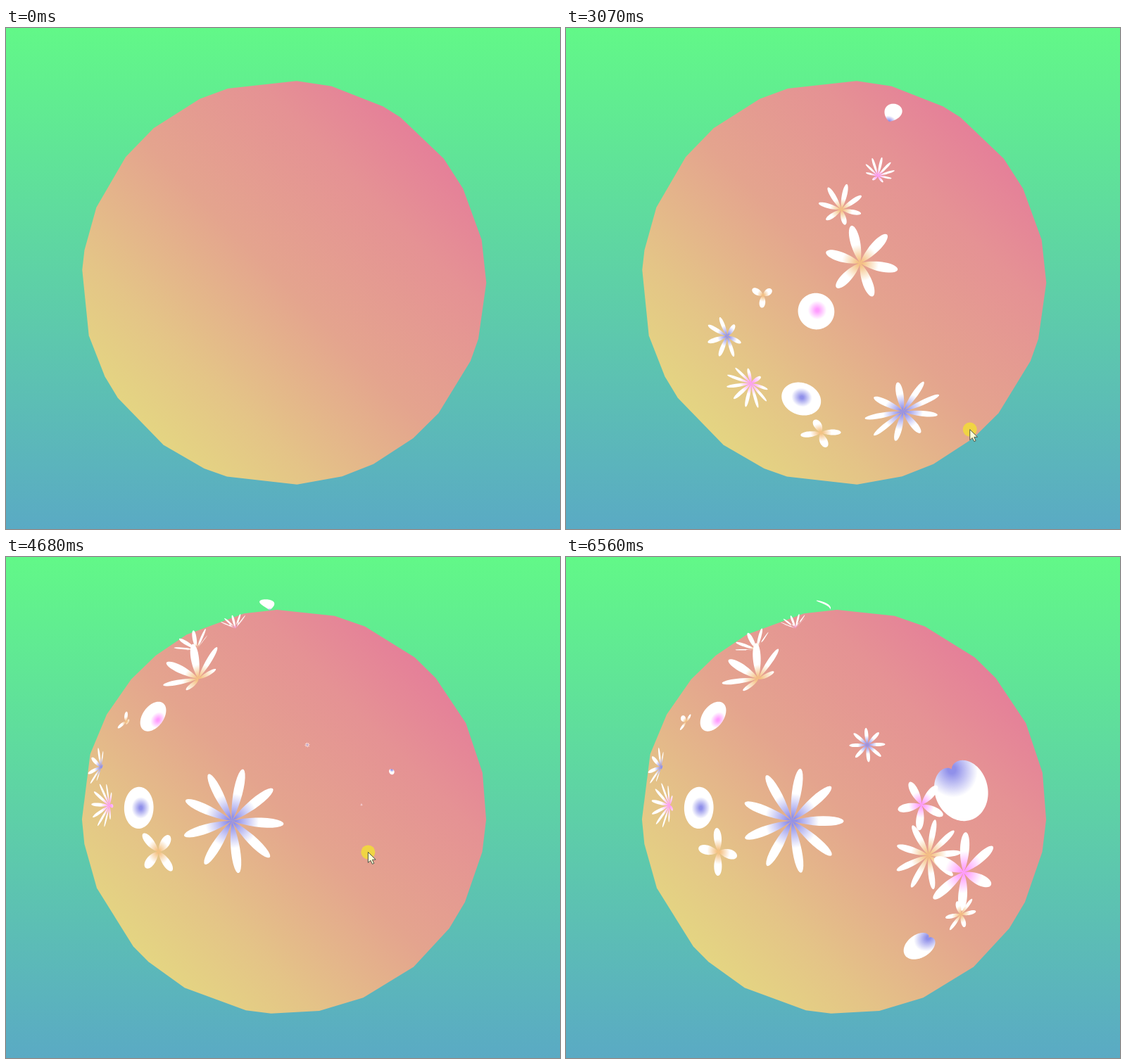
An HTML page with a canvas for the animation above (6640 ms loop, 787 by 712 pixels).

```html
<!DOCTYPE html>
<html>
<head>
<meta charset="utf-8">
<style>
  html, body { margin: 0; width: 100%; height: 100%; overflow: hidden; }
  canvas { display: block; }
</style>
</head>
<body>
<canvas id="stage" width="787" height="712"></canvas>
<script>
const ctx = document.getElementById('stage').getContext('2d');
const LOOP = 6640, FIRST = 110, STEP = 78.3;
const CX = 395, CY = 362, RADIUS = 287.3, CORNERS = 28;
const FOCAL = 763, DIST = 2.84;            // perspective camera, unit sphere
const RAD = Math.PI / 180, TURN = 36 * RAD;
const AXIS = [0.748, -0.663, 0.026];       // the drag turns the ball about this
const BLUE = '#9090ea', PINK = '#ff9cff', ORANGE = '#f5c284';

// x, y, petals (0 is a disc), petal length, heart colour
const firstRow = [
  [459, 133, 1, 30, BLUE], [443, 210, 9, 27, PINK], [391, 258, 7, 37, ORANGE], [418, 334, 6, 57, ORANGE],
  [357, 401, 0, 28, PINK], [263, 505, 10, 38, PINK], [229, 438, 7, 33, BLUE], [280, 380, 3, 18, ORANGE],
  [335, 525, 0, 32, BLUE], [362, 575, 4, 37, ORANGE], [479, 545, 9, 75, BLUE]
];
const secondRow = [
  [428, 267, 8, 26, BLUE], [548, 302, 1, 80, BLUE], [505, 352, 5, 37, PINK], [515, 424, 9, 53, ORANGE],
  [565, 448, 6, 63, PINK], [515, 541, 1, 46, BLUE], [561, 508, 6, 30, ORANGE]
];

const plant = (row, born, gap, turns, offset) => row.map(([x, y, petals, size, color], k) => {
  const i = k + offset;
  return {
    x, y, petals, color, turns, born: born + gap * k, pos: unproject(x, y), size: size / 411,
    cup: Math.max(0, 40 - 4 * i) * RAD,
    angle: (60 + 109.5 * (i - 12)) * RAD,
    rate: 41 * RAD * Math.cos(122 * (i - 10) * RAD)
  };
});
const flowers = [
  ...plant(firstRow, 940, 98, true, 0),
  ...plant(secondRow, 4440, 72, false, firstRow.length)
];

// The pointer visits every flower as it is planted
const path = [
  [110, 760, 690], [730, 441, 166], [1360, 293, 414], [2140, 553, 560], [2500, 625, 572], [3070, 577, 575],
  [3710, 442, 393], [4200, 400, 254], [5200, 606, 580], [5760, 785, 710],
  ...flowers.map(f => [f.born, f.x, f.y])
].sort((a, b) => a[0] - b[0]);

function pointerAt(t) {
  const i = Math.max(1, path.findIndex(p => p[0] > t));
  const [t0, x0, y0] = path[i - 1], [t1, x1, y1] = path[i], f = (t - t0) / (t1 - t0);
  return [x0 + (x1 - x0) * f, y0 + (y1 - y0) * f];
}

function smooth(t, from, to) {
  const f = Math.min(1, Math.max(0, (t - from) / (to - from)));
  return f * f * (3 - 2 * f);
}

function unproject(sx, sy) {
  const u = (sx - CX) / FOCAL, v = (sy - CY) / FOCAL, q = u * u + v * v;
  const z = (q * DIST + Math.sqrt(1 + q - q * DIST * DIST)) / (1 + q);
  return [u * (DIST - z), v * (DIST - z), z];
}

function project([x, y, z]) {
  const s = FOCAL / (DIST - z);
  return [CX + x * s, CY + y * s, s];
}

const cross = (a, b) => [a[1] * b[2] - a[2] * b[1], a[2] * b[0] - a[0] * b[2], a[0] * b[1] - a[1] * b[0]];

function rotate(v, angle) {
  const c = Math.cos(angle), s = Math.sin(angle), side = cross(AXIS, v);
  const along = v.reduce((sum, x, k) => sum + x * AXIS[k], 0) * (1 - c);
  return v.map((x, k) => x * c + side[k] * s + AXIS[k] * along);
}

function polygon(points) {
  ctx.beginPath();
  points.forEach(p => ctx.lineTo(p[0], p[1]));
  ctx.closePath();
}

function gradient(g, stops) {
  stops.forEach(([at, color]) => g.addColorStop(at, color));
  return g;
}

function drawScene(turn) {
  ctx.fillStyle = gradient(ctx.createLinearGradient(0, 0, 0, 712), [[0, '#62f888'], [1, '#5aaac4']]);
  ctx.fillRect(0, 0, 787, 712);
  // uneven corners of a low-poly ball, shifting as it turns
  polygon(Array.from({ length: CORNERS }, (_, i) => {
    const a = (i + 0.3 * Math.sin(i * i + 4 * turn)) * 2 * Math.PI / CORNERS;
    return [CX + RADIUS * Math.cos(a), CY + RADIUS * Math.sin(a)];
  }));
  ctx.fillStyle = gradient(ctx.createLinearGradient(192, 565, 600, 160),
    [[0, '#e4d582'], [0.2, '#e4c487'], [0.5, '#e4a48e'], [0.8, '#e59294'], [1, '#e57f99']]);
  ctx.fill();
}

function drawFlower(f, t, turn) {
  const grown = Math.min(1, (t - f.born) * 0.00069);
  if (grown <= 0) return;
  const n = f.turns ? rotate(f.pos, turn) : f.pos;
  const len = Math.hypot(n[1], n[2]);
  const e1 = [len, -n[0] * n[1] / len, -n[0] * n[2] / len], e2 = cross(n, e1);
  const size = f.size * grown, power = f.petals === 1 ? 2.6 : 2;
  const spin = f.angle + f.rate * (t - 6560) / 1000;
  const flat = Math.cos(f.cup), lift = Math.sin(f.cup);
  polygon(Array.from({ length: 240 }, (_, i) => {
    const a = i * Math.PI / 120;
    const r = size * Math.abs(Math.cos(f.petals * a / 2)) ** power;
    const c = Math.cos(a + spin) * flat, s = Math.sin(a + spin) * flat;
    return project(n.map((v, k) => v + r * (e1[k] * c + e2[k] * s + v * lift)));
  }));
  const [x, y, scale] = project(n), s = scale * flat;
  ctx.save();
  ctx.transform(e1[0] * s, e1[1] * s, e2[0] * s, e2[1] * s, x, y);
  ctx.fillStyle = gradient(ctx.createRadialGradient(0, 0, 0, 0, 0, size * 0.52),
    [[0, f.color], [0.15, f.color], [1, '#fff']]);
  ctx.fill();
  ctx.restore();
}

function drawPointer(t) {
  if (t < 110 || t > 5740) return;
  const [x, y] = pointerAt(t);
  const pressed = [[880, 1990], [2980, 4130], [4400, 4980]].some(([a, b]) => t >= a && t < b);
  if (pressed) {
    ctx.fillStyle = '#f0d444';
    ctx.beginPath();
    ctx.arc(x, y, 10, 0, 7);
    ctx.fill();
  }
  polygon([[0, 0], [0, 15], [3.5, 11.8], [6, 17], [8.4, 16], [6, 10.8], [10.8, 10.6]].map(p => [x + p[0], y + p[1]]));
  ctx.fillStyle = pressed ? '#ffffd8' : '#fff';
  ctx.fill();
  ctx.strokeStyle = '#4b5548';
  ctx.lineWidth = 1;
  ctx.stroke();
}

const start = performance.now();

function frame() {
  const raw = (performance.now() - start) % LOOP;
  // the picture advances in even ticks
  const t = raw < FIRST ? 0 : FIRST + Math.floor((raw - FIRST + 20) / STEP) * STEP;
  const turn = TURN * smooth(t, 3077, 4370);
  drawScene(turn);
  flowers.forEach(f => drawFlower(f, t, turn));
  drawPointer(t);
  requestAnimationFrame(frame);
}
frame();
</script>
</body>
</html>
```
